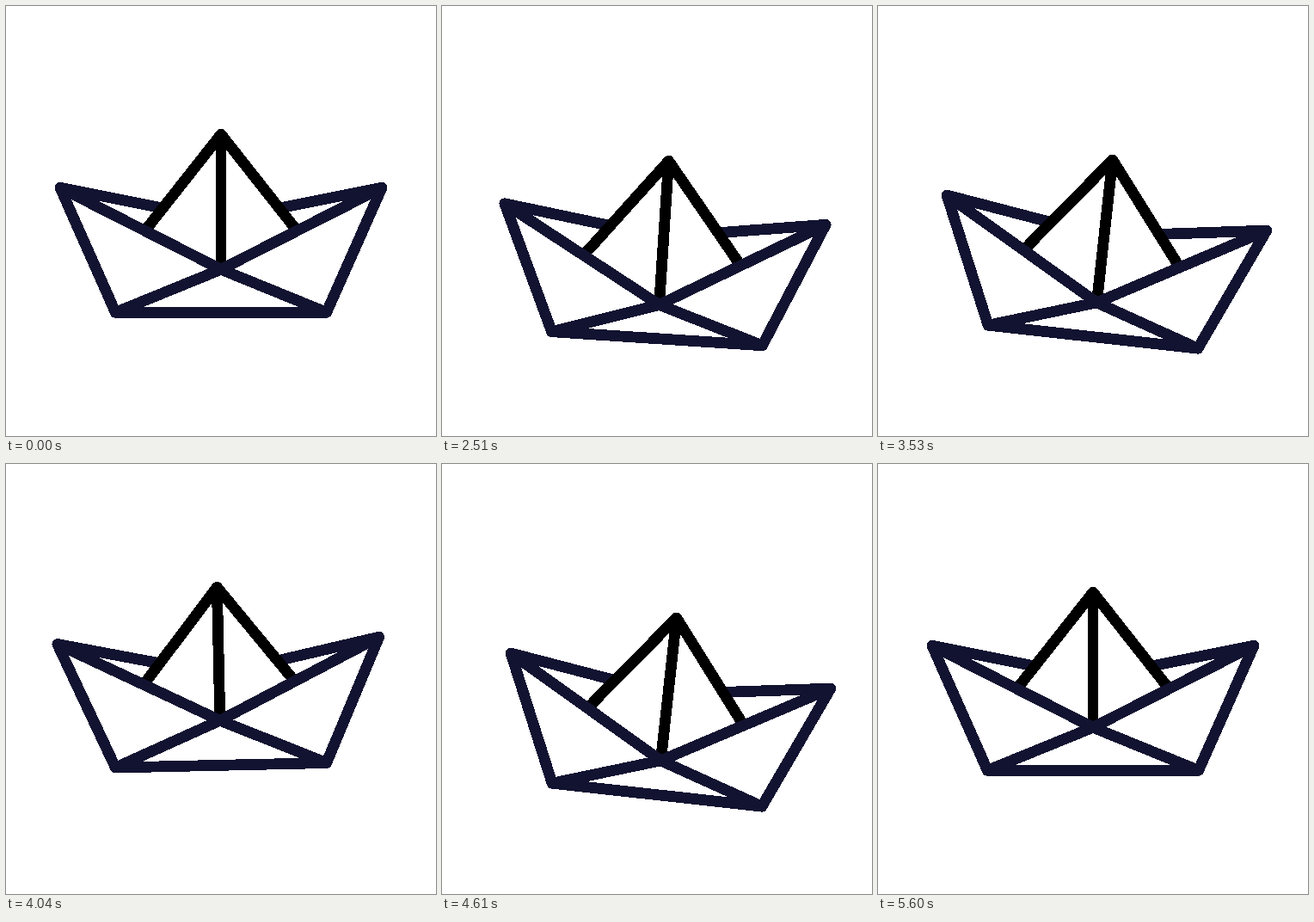
Recreate the animation shown at these times as an HTML page. Size 500 px wide and 500 px high, loop 5.66 s.

```html
<!DOCTYPE html>
<html lang="en">
<head>
<meta charset="utf-8">
<title>Paper boat</title>
<style>
  html, body { margin: 0; width: 100%; height: 100%; overflow: hidden; background: #fff; }
  svg { display: block; width: 100vw; height: 100vh; shape-rendering: crispEdges; }
  path { fill: none; stroke-width: 12.8; stroke-linecap: round; stroke-linejoin: round; }
  .hull { stroke: #121331; }
  .sail { stroke: #000; }
  .cover { fill: #fff; }
</style>
</head>
<body>
<svg viewBox="0 0 500 500">
  <g id="boat">
    <path id="rim" class="hull"/>
    <path class="sail cover" d="M150 276L250 149.3L350 276"/>
    <path id="mast" class="sail"/>
    <path id="front" class="hull cover"/>
    <path id="folds" class="hull"/>
  </g>
</svg>
<script>
const LOOP = 5660, START = 2000, STEP = 30, STEPS = 120;
const HALF = 18, TURNS = 5; // steps per half swing, half swings before settling

const part = id => document.getElementById(id);
const boat = part('boat'), rim = part('rim'), mast = part('mast');
const front = part('front'), folds = part('folds');

const ease = (a, b, u) => a + (b - a) * u * u * (3 - 2 * u);

// Rise from rest to the first crest, swing between high and low, settle at rest
function swing(s, crest, high, low) {
  const end = crest + HALF * TURNS;
  if (s < crest) return ease(0, high, s / crest);
  if (s >= end) return ease(low, 0, (s - end) / (STEPS - end));
  const phase = (s - crest) / HALF % 2;
  return ease(high, low, phase < 1 ? phase : 2 - phase);
}

function draw(ms) {
  const step = Math.floor((ms % LOOP - START) / STEP);
  const s = Math.min(STEPS, Math.max(0, step));
  const tilt = swing(s, HALF / 2 - 0.5, 11, -4.8);
  const bob = swing(s, HALF - 0.5, 30.5, -10);
  const open = bob * 0.35;
  const x = `250 ${306.3 + open}`;

  boat.setAttribute('transform', `translate(0 ${bob}) rotate(${tilt} 250 356.3)`);
  rim.setAttribute('d', `M63 211.3L250 ${248.5 - open}L437 211.3`);
  mast.setAttribute('d', `M250 149.3L${x}`);
  front.setAttribute('d', `M63 211.3L${x}L437 211.3L372.7 356.3H127.3Z`);
  folds.setAttribute('d', `M127.3 356.3L${x}L372.7 356.3`);
}

const began = performance.now();
function tick() {
  draw(performance.now() - began);
  requestAnimationFrame(tick);
}
tick();
</script>
</body>
</html>
```
